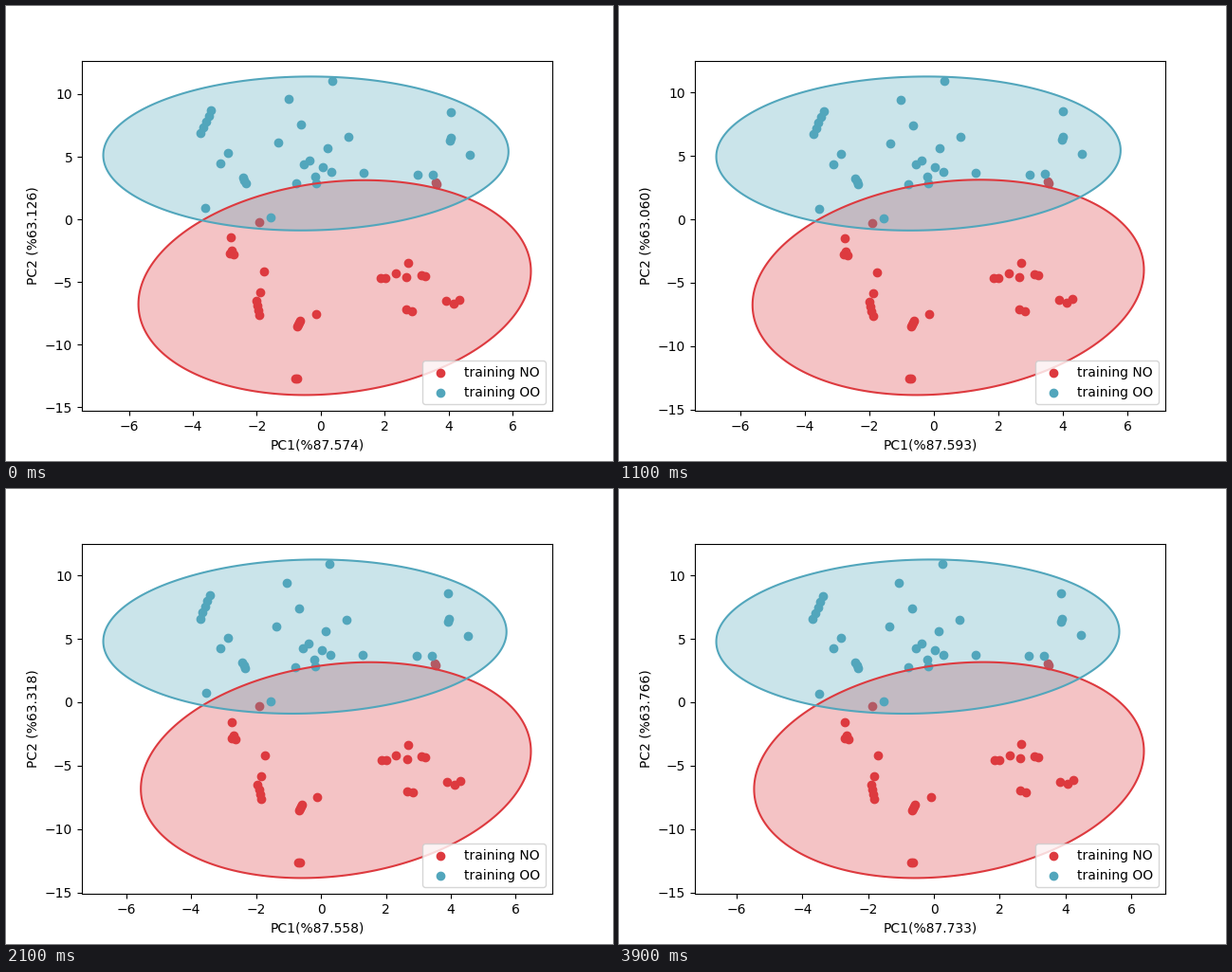
Animation, 640 px wide and 480 px high, one loop 4000 ms. Source, as a matplotlib script:

```python
import numpy as np
import matplotlib.pyplot as plt
from matplotlib.animation import FuncAnimation
from matplotlib.patches import Polygon

W, H, DPI = 640, 480, 100
FRAMES, INTERVAL = 40, 100
RED, BLUE = "#dd3a3f", "#52a6bc"
ORIGIN = np.array([332.3, 224.7])    # where both scores are zero, in pixels
CONFIDENCE = np.sqrt(-2 * np.log(0.05))  # radius of the 95 % ellipse


def streak(start, end, n):
    return np.linspace(start, end, n)


def cloud(*parts):
    """Join points and streaks given in pixels, measured from the origin, y up."""
    return (np.vstack(parts) - ORIGIN) * (1, -1)


NO_CLOUD = cloud(
    streak((264, 311), (267, 326), 4),
    streak((310, 332), (307, 338), 4),
    (267, 228), (238, 244), (239, 258), (237, 261), (241, 262), (272, 280),
    (268, 302), (327, 325), (305, 393), (307, 393), (395, 287), (400, 287),
    (411, 282), (424, 271), (422, 286), (438, 284), (442, 285), (422, 320),
    (428, 322), (464, 311), (472, 314), (478, 310), (453, 186), (454, 188),
)
OO_CLOUD = cloud(
    streak((217, 110), (206, 134), 5),
    streak((250, 181), (253, 187), 3),
    (235, 155), (227, 166), (211, 213), (279, 223), (287, 144), (298, 98),
    (311, 125), (344, 79), (361, 138), (339, 150), (320, 163), (314, 167),
    (334, 170), (326, 180), (327, 187), (306, 187), (343, 175), (377, 176),
    (434, 178), (450, 178), (469, 112), (469, 139), (468, 142), (489, 157),
)

# Key poses: the clouds swing about the origin while the percentages drift
KEY_FRAMES = (0, 8, 14, 21, 26, 32, 39)
SWING_DEG = (0, 0, 0.9, 1, -0.3, -0.3, 1.1)
PC1 = (87.574, 87.606, 87.580, 87.558, 87.499, 87.465, 87.733)
PC2 = (63.126, 62.980, 63.141, 63.318, 63.125, 63.162, 63.766)


def at(frame, values):
    return np.interp(frame, KEY_FRAMES, values)


def pose(points, frame):
    """Rotate a cloud and turn its pixels into component scores."""
    swing = at(frame, SWING_DEG)
    c, s = np.cos(np.radians(swing)), np.sin(np.radians(swing))
    scale = (33.68 + 0.026 * frame + 0.12 * swing,
             13.22 + 0.17 * min(1, frame / 8))
    return points @ np.array([[c, s], [-s, c]]) / scale


def confidence_ellipse(points):
    t = np.linspace(0, 2 * np.pi, 240, endpoint=False)
    circle = np.column_stack([np.cos(t), np.sin(t)])
    spread = np.linalg.cholesky(np.cov(points.T))
    return points.mean(axis=0) + CONFIDENCE * circle @ spread.T


fig, ax = plt.subplots(figsize=(W / DPI, H / DPI), dpi=DPI)


def add_group(points, color, label):
    dots = ax.scatter(*points.T, color=color, label=label)
    fill = ax.add_patch(Polygon(points, facecolor=color, edgecolor="none", alpha=0.3))
    edge = ax.add_patch(Polygon(points, fill=False, edgecolor=color, lw=1.5, zorder=2))
    return points, dots, fill, edge


groups = [
    add_group(NO_CLOUD, RED, "training NO"),
    add_group(OO_CLOUD, BLUE, "training OO"),
]
ax.legend(loc="lower right")


def update(frame):
    outlines = []
    for points, dots, fill, edge in groups:
        scores = pose(points, frame)
        outline = confidence_ellipse(scores)
        dots.set_offsets(scores)
        fill.set_xy(outline)
        edge.set_xy(outline)
        outlines.append(outline)

    # Fit the axes to both ellipses with a 5 % margin
    extent = np.vstack(outlines)
    low, high = extent.min(axis=0), extent.max(axis=0)
    margin = 0.05 * (high - low)
    ax.set_xlim(low[0] - margin[0], high[0] + margin[0])
    ax.set_ylim(low[1] - margin[1], high[1] + margin[1])
    ax.set_xlabel(f"PC1(%{at(frame, PC1):.3f})")
    ax.set_ylabel(f"PC2 (%{at(frame, PC2):.3f})")
    return []


anim = FuncAnimation(fig, update, frames=FRAMES, interval=INTERVAL,
                     repeat=True, repeat_delay=0, blit=False)
plt.show()
```
